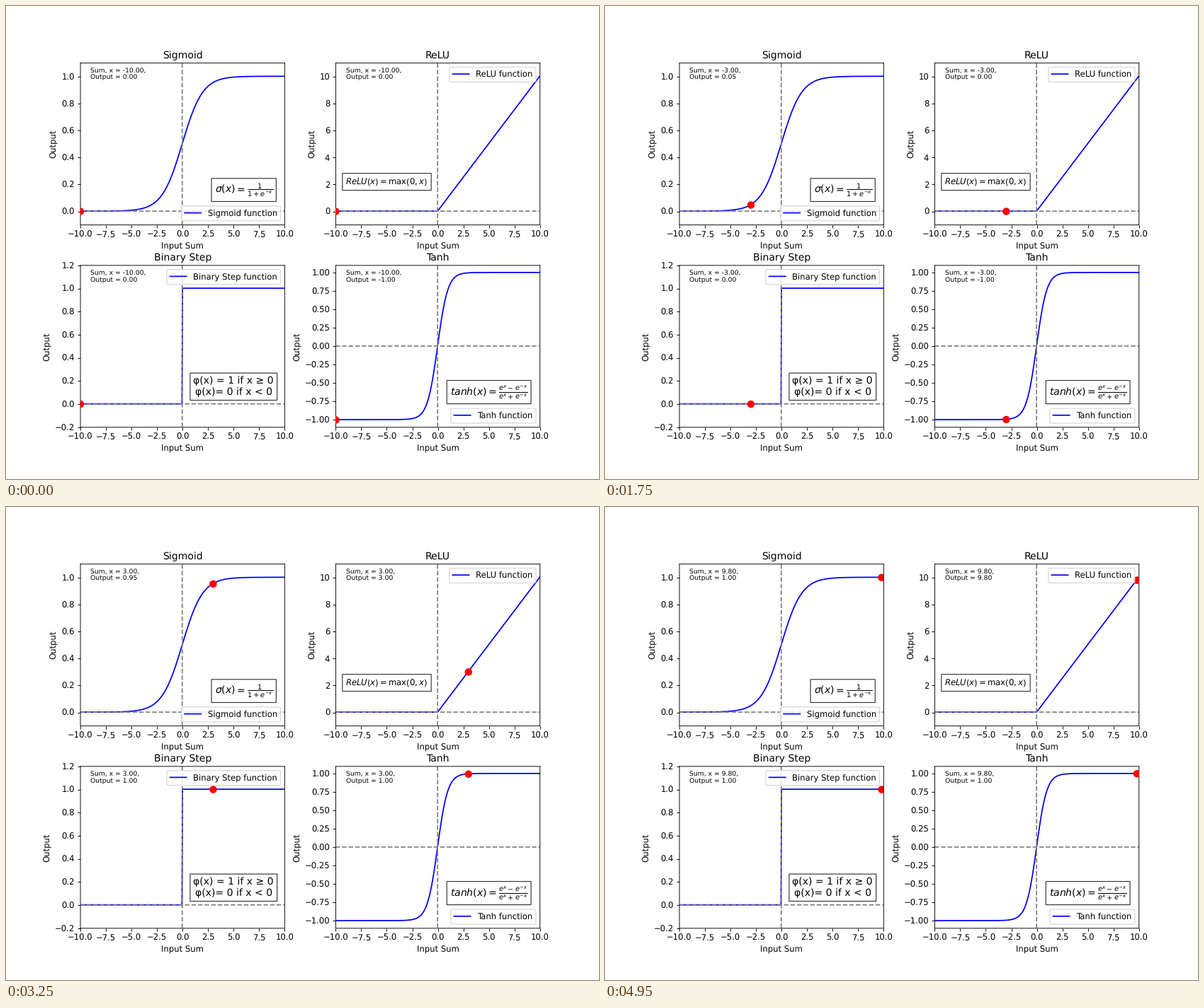
Write a matplotlib script that moves like this. It is 837 px wide and 669 px high and loops after 5 s.

```python
import numpy as np
import matplotlib.pyplot as plt
from matplotlib.animation import FuncAnimation
from matplotlib.patches import Ellipse
from matplotlib.transforms import Affine2D

DPI = 83.7
WIDTH, HEIGHT = 837, 669
DOT = 10.46    # dot diameter in pixels
SHIFT = 0.42   # frames, boxes and dots sit this far right of and below the curves

# Smooth sub-pixel placement for lines and glyphs.
plt.rcParams.update({"font.family": "DejaVu Sans",
                     "path.snap": False,
                     "text.hinting": "no_hinting"})


def sigmoid(x):
    return 1 / (1 + np.exp(-x))


def relu(x):
    return np.maximum(0, x)


def step(x):
    return np.where(x >= 0, 1.0, 0.0)


# name, function, y limits, legend place, formula, formula position, formula size
PANELS = [
    ("Sigmoid", sigmoid, (-0.1, 1.1), "lower right",
     r"$\sigma(x) = \frac{1}{1 + e^{-x}}$", (0.8, 0.2), 12),
    ("ReLU", relu, (-1, 11), "upper right",
     r"$ReLU(x) = \max(0, x)$", (0.25, 0.25), 10),
    ("Binary Step", step, (-0.2, 1.2), "upper right",
     "φ(x) = 1 if x ≥ 0\nφ(x)= 0 if x < 0", (0.75, 0.2), 12),
    ("Tanh", np.tanh, (-1.1, 1.1), "lower right",
     r"$tanh(x) = \frac{e^{x} - e^{-x}}{e^{x} + e^{-x}}$", (0.75, 0.2), 12),
]

fig, axes = plt.subplots(2, 2, figsize=(WIDTH / DPI, HEIGHT / DPI), dpi=DPI)
dx, dy = SHIFT / WIDTH, SHIFT / HEIGHT
fig.subplots_adjust(left=0.125 + dx, right=0.9 + dx,
                    bottom=0.11 - dy, top=0.88 - dy,
                    wspace=0.25, hspace=0.25)

curve_x = np.linspace(-10, 10, 400)
sums = np.arange(-10, 10, 0.2)
unshift = Affine2D().translate(-SHIFT, SHIFT)


def make_dot(ax):
    box = ax.get_window_extent()
    width = DOT * np.ptp(ax.get_xlim()) / box.width
    height = DOT * np.ptp(ax.get_ylim()) / box.height
    return ax.add_patch(Ellipse((0, 0), width, height, fc="red", ec="none",
                                zorder=3))


def draw_panel(ax, name, func, ylim, legend_loc, formula, pos, size):
    curve, = ax.plot(curve_x, func(curve_x), color="blue",
                     label=f"{name} function")
    across = ax.axhline(0, color="gray", linestyle="--")
    upright = ax.axvline(0, color="gray", linestyle="--")
    ax.set(title=name, xlabel="Input Sum", ylabel="Output",
           xlim=(-10, 10), ylim=ylim)
    for line in (curve, across, upright):
        line.set_transform(line.get_transform() + unshift)
    ax.legend(loc=legend_loc)
    ax.text(*pos, formula, transform=ax.transAxes, fontsize=size, ha="center",
            bbox=dict(facecolor="white", alpha=0.8))
    readout = ax.text(0.05, 0.9, "", transform=ax.transAxes, fontsize=8)
    return func, make_dot(ax), readout


movers = [draw_panel(ax, *panel) for ax, panel in zip(axes.flat, PANELS)]


def update(i):
    x = sums[i]
    for func, dot, readout in movers:
        y = float(func(x))
        dot.set_center((x, y))
        readout.set_text(f"Sum, x = {x:.2f},\nOutput = {y:.2f}")
    return [artist for _, *pair in movers for artist in pair]


anim = FuncAnimation(fig, update, frames=len(sums), interval=50,
                     repeat=True, repeat_delay=0, blit=False)

plt.show()
```
